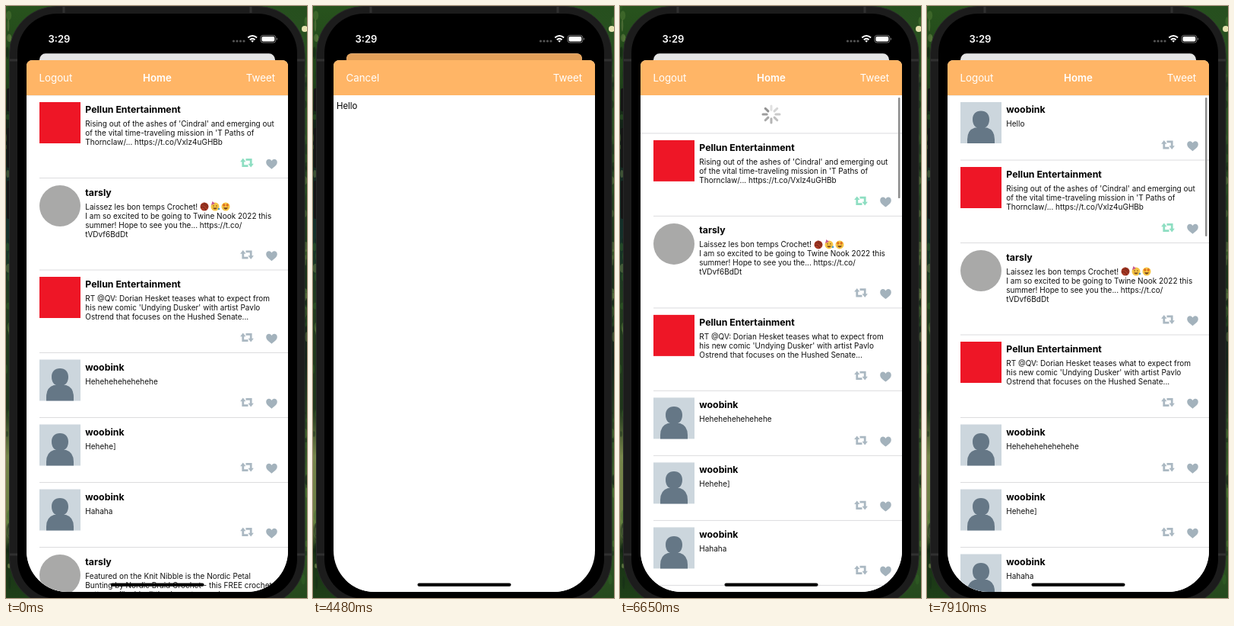
Recreate the animation shown at these times as an HTML page. Size 396 by 776 pixels, loop 8 s.

```html
<!DOCTYPE html>
<html lang="en">
<head>
<meta charset="utf-8">
<title>Timeline app</title>
<style>
html, body { margin: 0; width: 100%; height: 100%; overflow: hidden; background: #000; }
svg { display: block; width: 396px; height: 776px; }
text { font-family: Inter, Roboto, sans-serif; white-space: pre; }
.nav { font-size: 13.3px; fill: #fff; }
.bold { font-weight: 600; }
.name { font-size: 12.3px; font-weight: 700; }
.body { font-size: 10px; fill: #111; }
</style>
</head>
<body>
<svg viewBox="0 0 396 776" xmlns="http://www.w3.org/2000/svg">
  <defs>
    <clipPath id="screen"><rect x="27" width="344" height="768" rx="54"/></clipPath>
    <linearGradient id="leftWall" x2="0" y2="1">
      <stop offset="0" stop-color="#28531d"/><stop offset=".13" stop-color="#1f4219"/>
      <stop offset=".2" stop-color="#132317"/><stop offset=".38" stop-color="#13302a"/>
      <stop offset=".5" stop-color="#223c1e"/><stop offset=".68" stop-color="#1f361b"/>
      <stop offset=".76" stop-color="#76854a"/><stop offset=".87" stop-color="#6d7f45"/>
      <stop offset=".92" stop-color="#183014"/><stop offset="1" stop-color="#1e3f18"/>
    </linearGradient>
    <linearGradient id="rightWall" x2="0" y2="1">
      <stop offset="0" stop-color="#264f1e"/><stop offset=".2" stop-color="#2e5425"/>
      <stop offset=".45" stop-color="#1a3419"/><stop offset=".6" stop-color="#122218"/>
      <stop offset=".8" stop-color="#3e652b"/><stop offset="1" stop-color="#25491d"/>
    </linearGradient>
    <g id="retweet">
      <g id="arrow"><path d="M-5.200 -2.500V4.200H1.500" fill="none" stroke="currentColor" stroke-width="2.800"/>
      <path d="M-8.900 -1.300L-5.200 -6L-1.500 -1.300Z" fill="currentColor"/></g>
      <use href="#arrow" transform="rotate(180)"/>
    </g>
    <path id="heart" fill="#a3b2bc" d="M0 6.700C-3 4.400 -7.300 1.600 -7.300 -2.200C-7.300 -4.900 -5.300 -6.300 -3.500 -6.300C-1.800 -6.300 -.6 -5.300 0 -4C.6 -5.300 1.800 -6.300 3.500 -6.300C5.300 -6.300 7.300 -4.900 7.300 -2.200C7.300 1.600 3 4.400 0 6.700Z"/>
    <path id="bar" fill="#ffb566" d="M27 117V79Q27 71 35 71H363Q371 71 371 79V117Z"/>
  </defs>

  <g id="wall">
    <rect width="200" height="776" fill="url(#leftWall)"/>
    <rect x="200" width="196" height="776" fill="url(#rightWall)"/>
  </g>

  <g fill="#151515">
    <rect x="1" y="108" width="6" height="30" rx="2"/>
    <rect x="1" y="160" width="6" height="52" rx="2"/>
    <rect x="1" y="229" width="6" height="50" rx="2"/>
  </g>
  <rect x="4.500" y=".5" width="388.500" height="786" rx="62" fill="#1c1c1c" stroke="#292929"/>
  <path d="M5 71H15M383 71H393M5 719H15M383 719H393M76 1V9M322 1V9" stroke="#303030" stroke-width="3"/>
  <rect x="15" y="10" width="368" height="767" rx="52"/>

  <text class="bold" x="55.500" y="48" font-size="13" fill="#fff">3:29</text>
  <g fill="#555"><circle cx="299.500" cy="46" r="1.600"/><circle cx="304" cy="46" r="1.600"/><circle cx="308.500" cy="46" r="1.600"/><circle cx="313" cy="46" r="1.600"/></g>
  <g fill="none" stroke="#fff" stroke-width="2">
    <path d="M318.300 41.500Q324.200 36.500 330.100 41.500M320.800 44.300Q324.200 41.500 327.600 44.300"/>
    <path d="M322.400 45.700Q324.200 44.400 326 45.700L324.200 47.800Z" fill="#fff" stroke="none"/>
  </g>
  <rect x="335" y="38.500" width="19.800" height="9.500" rx="3" fill="none" stroke="#777"/>
  <rect x="336.500" y="40" width="16.800" height="6.500" rx="1.700" fill="#fff"/>
  <path d="M356 41.500Q358 43.200 356 45Z" fill="#888"/>

  <g clip-path="url(#screen)">
    <rect id="login" x="44" width="310" height="60" rx="8" fill="#e5e5e5"/>
    <g id="feed">
      <rect x="27" y="71" width="344" height="740" rx="8" fill="#fff"/>
      <g id="spinner" transform="translate(199 142)" stroke="#4a4a4a" stroke-width="3" stroke-linecap="round"></g>
      <g id="rows">
        <rect x="27" width="344" height="800" fill="#fff"/>
        <path d="M27 0H371" stroke="#dcdcde"/>
        <g id="stack"></g>
      </g>
      <use href="#bar"/>
      <text class="nav" x="43.500" y="99">Logout</text>
      <text class="nav bold" x="199" y="99" text-anchor="middle">Home</text>
      <text class="nav" x="354" y="99" text-anchor="end">Tweet</text>
      <rect id="thumb" x="366" y="120" width="2.500" rx="1.200" fill="#8c8c8c"/>
      <rect id="dim" x="27" y="71" width="344" height="740" rx="8"/>
    </g>
    <g id="compose">
      <rect x="27" y="71" width="344" height="740" rx="8" fill="#fff"/>
      <use href="#bar"/>
      <text class="nav" x="43.500" y="99">Cancel</text>
      <text class="nav" x="354" y="99" text-anchor="end">Tweet</text>
      <text id="draft" x="31" y="135.300" font-size="11.400"></text>
      <rect id="caret" y="123" width="1.600" height="15.500" rx=".6" fill="#3f63c8"/>
    </g>
  </g>
  <rect x="137.500" y="756.500" width="123" height="4.300" rx="2.100"/>
</svg>

<script>
const LOOP = 8000;
const $ = id => document.getElementById(id);
const clamp = v => Math.max(0, Math.min(1, v));
const ramp = (t, a, b) => clamp((t - a) / (b - a));
const smooth = u => u * u * (3 - 2 * u);
const set = (id, attrs) => { for (const k in attrs) $(id).setAttribute(k, attrs[k]); };

// Critically damped spring from 0 to 1; times in ms
function spring(t, start, rate) {
  const x = Math.max(0, t - start) / 1000 * rate;
  return 1 - (1 + x) * Math.exp(-x);
}

// Overscroll resistance of a list 651 px high
const rubber = drag => 651 * (1 - 1 / (1 + 0.55 * drag / 651));

const avatars = {
  studio: '<rect x="44" y="9" width="54" height="54" fill="#ee1626"/>',
  maker: '<circle cx="71" cy="36.500" r="27" fill="#a9a9a8"/>',
  person: `<rect x="44" y="9" width="54" height="54" fill="#ccd6dd"/>
    <path d="M71 20.500C78 20.500 82 25 82 31.500C82 38 79 43.500 71 43.500C63 43.500 60 38 60 31.500C60 25 64 20.500 71 20.500ZM53 63V58Q53 45.500 63 42.500H79Q89 45.500 89 58V63Z" fill="#657786"/>`
};

const faces = `<g transform="translate(261 37.500)">
  <circle r="5.500" fill="#a83a25"/><path d="M-4 -2Q1 -4 4 2M-5 1Q0 -1 2 5M-1 -5Q4 -2 5 0" fill="none" stroke="#6d2015"/>
  <circle cx="14" r="5.500" fill="#f6c544"/><path d="M11 1.500Q14 5.500 17 1.500Z" fill="#70401c"/>
  <path d="M9 -2L10.500 -7L14 -4Z" fill="#c75a93"/><path d="M11.300 -1H13M15 -1H16.700" stroke="#70401c"/><circle cx="19" cy="3" r="1.300" fill="#4c9bc4"/>
  <circle cx="28" r="5.500" fill="#f6c544"/><path d="M24.800 1.300Q28 6 31.200 1.300Z" fill="#70401c"/>
  <path d="M25.800 -4L26.700 -2L25.800 0L24.900 -2ZM23.800 -2H27.800M30.200 -4L31.100 -2L30.200 0L29.300 -2ZM28.200 -2H32.200" fill="#dd6a20" stroke="#dd6a20" stroke-width=".8"/></g>`;

const studio = 'Pellun Entertainment', maker = 'tarsly', person = 'woobink';
const note = text => ({ who: person, pic: 'person', h: 85, lines: [text] });
const posts = [
  note('Hello'),
  { who: studio, pic: 'studio', h: 108.5, liked: true, lines: [
    "Rising out of the ashes of 'Cindral' and emerging out",
    "of the vital time-traveling mission in 'T Paths of",
    'Thornclaw/... https://t.co/VxIz4uGHBb'] },
  { who: maker, pic: 'maker', h: 120.5, extra: faces, lines: [
    'Laissez les bon temps Crochet!',
    'I am so excited to be going to Twine Nook 2022 this',
    'summer! Hope to see you the... https://t.co/',
    'tVDvf6BdDt'] },
  { who: studio, pic: 'studio', h: 108.5, lines: [
    'RT @QV: Dorian Hesket teases what to expect from',
    "his new comic 'Undying Dusker' with artist Pavlo",
    'Ostrend that focuses on the Hushed Senate...'] },
  note('Hehehehehehehehe'), note('Hehehe]'), note('Hahaha'),
  { who: maker, pic: 'maker', h: 120.5, lines: [
    'Featured on the Knit Nibble is the Nordic Petal',
    'Bunting by Nordic Braid Crochet - this FREE crochet',
    'pattern will add a little charm to your home'] }
];

function rowMarkup(post, y) {
  const lines = post.lines.map((s, i) => `<text class="body" x="104.300" y="${41 + i * 12}">${s}</text>`).join('');
  const tint = post.liked ? '#8edec2' : '#aab8c2';
  return `<g transform="translate(0 ${y})">${avatars[post.pic]}
    <text class="name" x="104.300" y="23">${post.who}</text>${lines}${post.extra || ''}
    <use href="#retweet" x="317" y="${post.h - 20}" color="${tint}"/>
    <use href="#heart" x="349.500" y="${post.h - 18.5}"/>
    <path d="M44 ${post.h}H371" stroke="#dcdcde"/></g>`;
}

// The new post sits just above the list until the reload moves it in
function buildRows() {
  let y = -posts[0].h;
  const parts = posts.map(post => {
    const part = rowMarkup(post, y);
    y += post.h;
    return part;
  });
  $('stack').innerHTML = `<g id="fresh">${parts[0]}</g>${parts.slice(1).join('')}`;
}

function buildWall() {
  let seed = 7;
  const rnd = () => (seed = seed * 16807 % 2147483647) / 2147483647;
  const tints = ['#0f2112', '#356a27', '#5c843c', '#15291a', '#7c9154'];
  let s = '';
  for (let i = 0; i < 90; i++) {
    const x = (i % 2 ? 390 : 0) + rnd() * 6;
    s += `<ellipse cx="${x}" cy="${rnd() * 776}" rx="${1 + rnd() * 3}" ry="${2 + rnd() * 7}" fill="${tints[i % 5]}" opacity=".4"/>`;
  }
  s += '<circle cx="393" cy="30" r="4" fill="#e6e3b0"/>';
  $('wall').insertAdjacentHTML('beforeend', s);
}

function buildSpinner() {
  for (let i = 0; i < 8; i++)
    $('spinner').insertAdjacentHTML('beforeend', `<path d="M0 -5.800V-11" transform="rotate(${i * 45})"/>`);
}

const keyTimes = [2100, 2170, 2240, 2450, 2660];

function drawSheet(t) {
  const p = spring(t, 585, 11) - spring(t, 5250, 11);
  const scale = 1 - 0.0988 * p;
  set('feed', { transform: `translate(199 ${71 - 8.7 * p}) scale(${scale}) translate(-199 -71)` });
  set('dim', { opacity: 0.115 * p });
  set('login', { y: 62.3 + 9 * p, opacity: clamp(1 - p) });
  set('compose', { transform: `translate(0 ${705 * (1 - p)})`, display: p > 0 ? 'inline' : 'none' });

  $('draft').textContent = 'Hello'.slice(0, keyTimes.filter(k => t >= k).length);
  const width = $('draft').textContent ? $('draft').getComputedTextLength() : -0.8;
  const lit = 1 - ramp(t, 1660, 1820) + ramp(t, 2099, 2100) - ramp(t, 3200, 3360)
    + ramp(t, 3480, 3710) - ramp(t, 4040, 4270) + ramp(t, 4620, 4760);
  set('caret', { x: 31 + width, opacity: lit });
}

function drawRefresh(t) {
  const reloadAt = 7350;
  const reloaded = t >= reloadAt;
  const drag = 670 * smooth(ramp(t, 6540, 7000));
  const offset = rubber(drag) * (1 - spring(t, 7050, 10.5));
  const pull = offset < 0.3 ? 0 : offset;
  set('rows', { transform: `translate(0 ${117 + pull})` });
  set('stack', { transform: `translate(0 ${reloaded ? posts[0].h : 0})` });
  set('fresh', { display: reloaded ? 'inline' : 'none' });
  set('thumb', { height: Math.max(6, 182 - pull), opacity: ramp(t, 6560, 6640) });

  const lead = Math.floor((t - 6700) / 100);
  const shown = clamp(pull / 60) * (1 - ramp(t, reloadAt, reloadAt + 200));
  [...$('spinner').children].forEach((spoke, i) => {
    const age = (((lead - i) % 8) + 8) % 8;
    spoke.setAttribute('opacity', shown * (0.72 - age * 0.075));
  });
}

function draw(t) {
  drawSheet(t);
  drawRefresh(t);
}

buildWall();
buildRows();
buildSpinner();
const begun = performance.now();
(function tick() {
  draw((performance.now() - begun) % LOOP);
  requestAnimationFrame(tick);
})();
</script>
</body>
</html>
```
